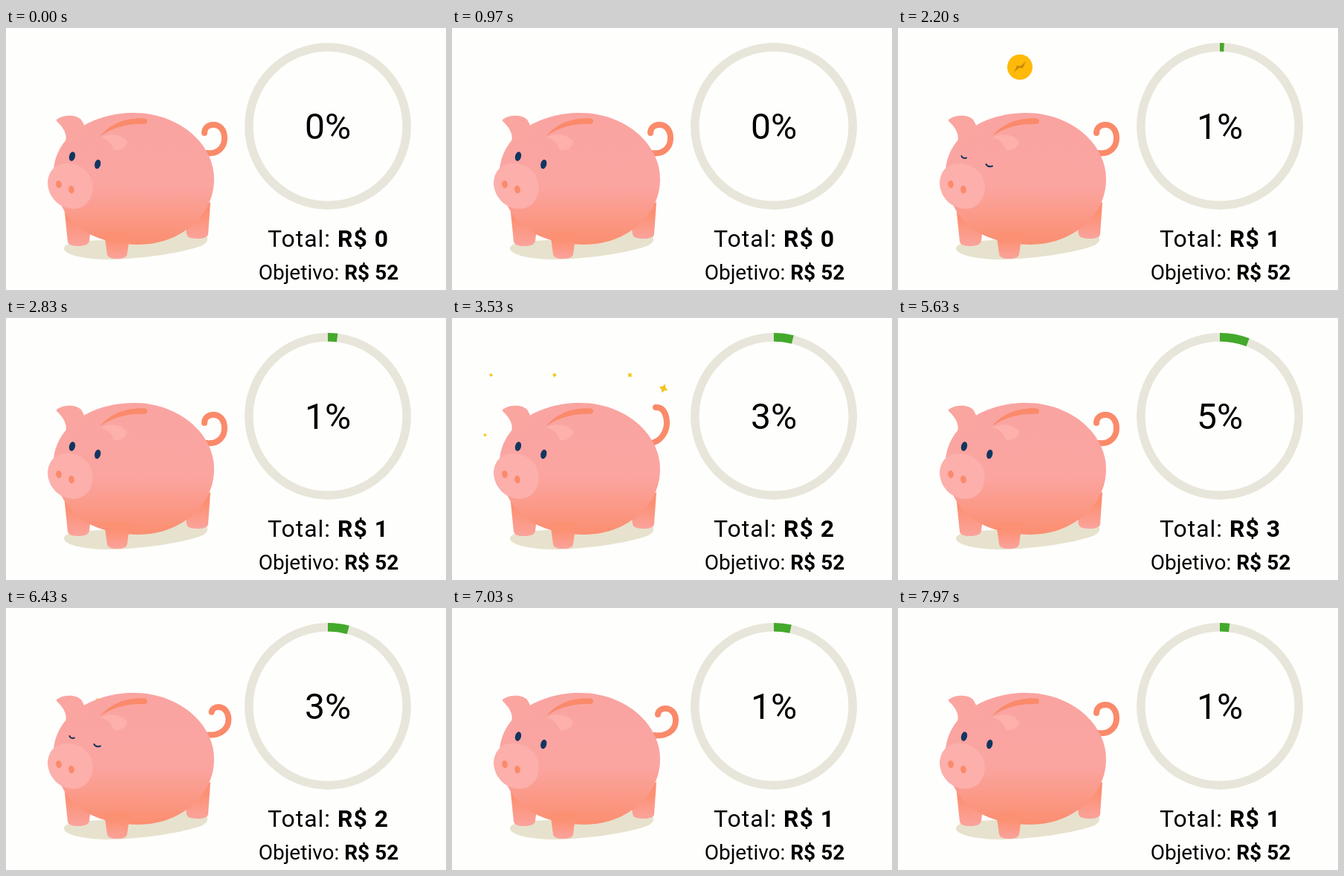
An HTML page for the animation above (8 s loop, 592 by 352 pixels).

```html
<!DOCTYPE html>
<html lang="pt-BR">
<head>
<meta charset="utf-8">
<title>Cofrinho</title>
<style>
  html, body { margin: 0; width: 100%; height: 100%; overflow: hidden; background: #fefefc; }
  svg { display: block; width: 592px; height: 352px; }
  text { font-family: Roboto, sans-serif; text-anchor: middle; white-space: pre; }
  .bold { font-weight: 700; }
  .dark { fill: #123560; }
  .orange { fill: #fa8a6a; }
  .lid { fill: none; stroke: #123560; stroke-width: 2; stroke-linecap: round; }
</style>
</head>
<body>
<svg viewBox="0 0 592 352">
  <defs>
    <linearGradient id="skin" gradientUnits="userSpaceOnUse" x1="0" y1="114" x2="0" y2="291">
      <stop offset="0" stop-color="#f9a4a1"/>
      <stop offset=".55" stop-color="#fba5a1"/>
      <stop offset=".98" stop-color="#fb8f72"/>
    </linearGradient>
    <linearGradient id="leg" x1="0" y1="0" x2="0" y2="1">
      <stop offset=".3" stop-color="#fc9072"/>
      <stop offset="1" stop-color="#fba39c"/>
    </linearGradient>
    <clipPath id="aboveSlot"><rect width="592" height="126"/></clipPath>
  </defs>

  <path fill="#e7e2cd" d="M78 296C79 288 100 286 130 285L250 272C274 274 277 287 262 293C230 304 170 311 135 311C100 310 78 304 78 296Z"/>
  <g id="sparkles" fill="#f2c51c"></g>
  <path id="tail" fill="none" stroke="#fa8a6a" stroke-width="8" stroke-linecap="round"/>

  <g fill="url(#leg)">
    <path d="M78 238L83 287Q84 293 97 293Q111 293 112 286L116 255Z"/>
    <path d="M275 234L272 277Q271 283 257 283Q244 283 243 277L239 250Z"/>
  </g>
  <path fill="url(#skin)" d="M64 190C68 143 118 114 172 114C232 114 280 155 280 203C280 252 235 291 178 291C122 291 84 267 72 232Z"/>
  <path fill="url(#leg)" d="M132 274L136 304Q137 310 149 310Q162 310 163 304L167 274Z"/>
  <path fill="#faa5a0" d="M68 123C77 116 94 116 101 123C105 129 107 137 112 142L79 155C84 145 78 134 68 125Z"/>
  <path class="orange" d="M127 145C140 129 162 120 187 121.500Q190 122 190 125Q190 129 186 129C162 128 143 134 127 145Z"/>
  <path fill="#fdb0ac" d="M127 147C140 140 155 143 163 152C163 160 155 165 145 164C143 156 137 150 127 147Z"/>
  <path fill="#fcafab" d="M56 207C57 194 64 184 78 182C102 180 117 197 117 215C116 232 105 243 91 243C73 243 56 228 56 207Z"/>
  <g class="orange">
    <ellipse cx="71" cy="210" rx="3.8" ry="5" transform="rotate(-8 71 210)"/>
    <ellipse cx="88" cy="217" rx="3.8" ry="5.2" transform="rotate(-8 88 217)"/>
  </g>
  <g id="openEyes" class="dark">
    <ellipse cx="89" cy="172.5" rx="4" ry="6.3" transform="rotate(14 89 172.5)"/>
    <ellipse cx="123.3" cy="183" rx="4" ry="6.3" transform="rotate(14 123.3 183)"/>
  </g>
  <g id="closedEyes" class="lid">
    <path d="M85.500 172Q87 176 92 174.500"/>
    <path d="M118.500 183Q121 187.500 127 185.500"/>
  </g>

  <g clip-path="url(#aboveSlot)">
    <g id="coin">
      <circle r="17" fill="#ffb908"/>
      <path fill="#c98d0a" d="M-8 7L-4 -2L1 -1.500L8 -8L4 1.500L-1 1Z"/>
    </g>
  </g>

  <g fill="none" stroke-width="11.500">
    <circle cx="433" cy="132" r="106.200" stroke="#e8e6da"/>
    <circle id="arc" cx="433" cy="132" r="106.200" stroke="#43a92b" pathLength="100" transform="rotate(-90 433 132)"/>
  </g>
  <text id="percent" x="433" y="149" font-size="48"></text>
  <text x="433.500" y="294" font-size="32" letter-spacing="1">Total: <tspan id="total" class="bold"></tspan></text>
  <text x="434" y="338" font-size="28">Objetivo: <tspan class="bold">R$ 52</tspan></text>
</svg>

<script>
const LOOP = 8000, GOAL = 52, FILL_TIME = 450;
const changes = [[2000, 1], [3020, 2], [3590, 3], [6050, 2], [6930, 1]];

const tailRest = [270,168, 286,170, 294,159, 294,148, 294,136, 287,130, 279,130, 272,130, 267,134, 267,141];
const tailOut  = [272,171, 288,173, 301,165, 301,151, 301,141, 295,135, 287,135, 281,135, 277,139, 277,143];
const tailUp   = [272,167, 281,164, 289,153, 289,141, 289,131, 285,123, 280,121, 278,120, 276,120, 274,120];
const tailKeys = [[0, tailRest], [100, tailOut], [200, tailRest], [340, tailOut], [510, tailUp], [680, tailRest]];

// x, y, radius and turn of each sparkle when the burst is at full spread
const sparkles = [[53, 77, 3, 20], [138, 77, 3.5, 10], [239, 77, 4, 40], [284, 95, 6.5, 20], [45, 157, 2.8, 15]];

const $ = id => document.getElementById(id);
const clamp = x => Math.min(1, Math.max(0, x));
const mix = (a, b, p) => a + (b - a) * p;
const show = (el, on) => el.setAttribute('visibility', on ? 'visible' : 'hidden');

const stars = sparkles.map(() => {
  const star = document.createElementNS('http://www.w3.org/2000/svg', 'path');
  star.setAttribute('d', 'M0-1L.35-.35L1 0L.35.35L0 1L-.35.35L-1 0L-.35-.35Z');
  return $('sparkles').appendChild(star);
});

function drawTail(u) {
  let points = tailRest;
  const next = tailKeys.findIndex(([at]) => at > u);
  if (next > 0) {
    const [t0, from] = tailKeys[next - 1], [t1, to] = tailKeys[next];
    const p = (1 - Math.cos(Math.PI * (u - t0) / (t1 - t0))) / 2;
    points = from.map((v, i) => mix(v, to[i], p));
  }
  $('tail').setAttribute('d', `M${points.slice(0, 2)}C${points.slice(2)}`);
}

function drawCoin(u) {
  const p = (u - 120) / 240;
  show($('coin'), p > 0 && p < 1);
  $('coin').setAttribute('transform', `translate(164 ${40 + 110 * p * p}) scale(${clamp((u - 120) / 60)})`);
}

function drawSparkles(u) {
  const q = (u - 330) / 290;
  show($('sparkles'), q > 0 && q < 1);
  const spread = 1.17 * (1 - (1 - q) ** 2);
  const size = Math.sqrt(Math.sin(Math.PI * clamp(q)));
  stars.forEach((star, i) => {
    const [x, y, r, turn] = sparkles[i];
    star.setAttribute('transform',
      `translate(${mix(165, x, spread)} ${mix(150, y, spread)}) rotate(${turn}) scale(${r * size})`);
  });
}

function drawSavings(index, u) {
  const total = index < 0 ? 0 : changes[index][1];
  const before = index < 1 ? 0 : changes[index - 1][1];
  const share = 100 * mix(before, total, clamp(u / FILL_TIME)) / GOAL;
  show($('arc'), share > 0);
  $('arc').setAttribute('stroke-dasharray', `${share} 100`);
  $('percent').textContent = Math.floor(100 * total / GOAL) + '%';
  $('total').textContent = 'R$ ' + total;
}

function draw(now) {
  const t = now % LOOP;
  const index = changes.filter(([at]) => at <= t).length - 1;
  const u = index < 0 ? LOOP : t - changes[index][0];
  const blinking = u > 130 && u < 430;
  show($('openEyes'), !blinking);
  show($('closedEyes'), blinking);
  drawTail(u);
  drawCoin(u);
  drawSparkles(u);
  drawSavings(index, u);
}

const start = performance.now();
function tick() {
  draw(performance.now() - start);
  requestAnimationFrame(tick);
}
tick();
</script>
</body>
</html>
```
